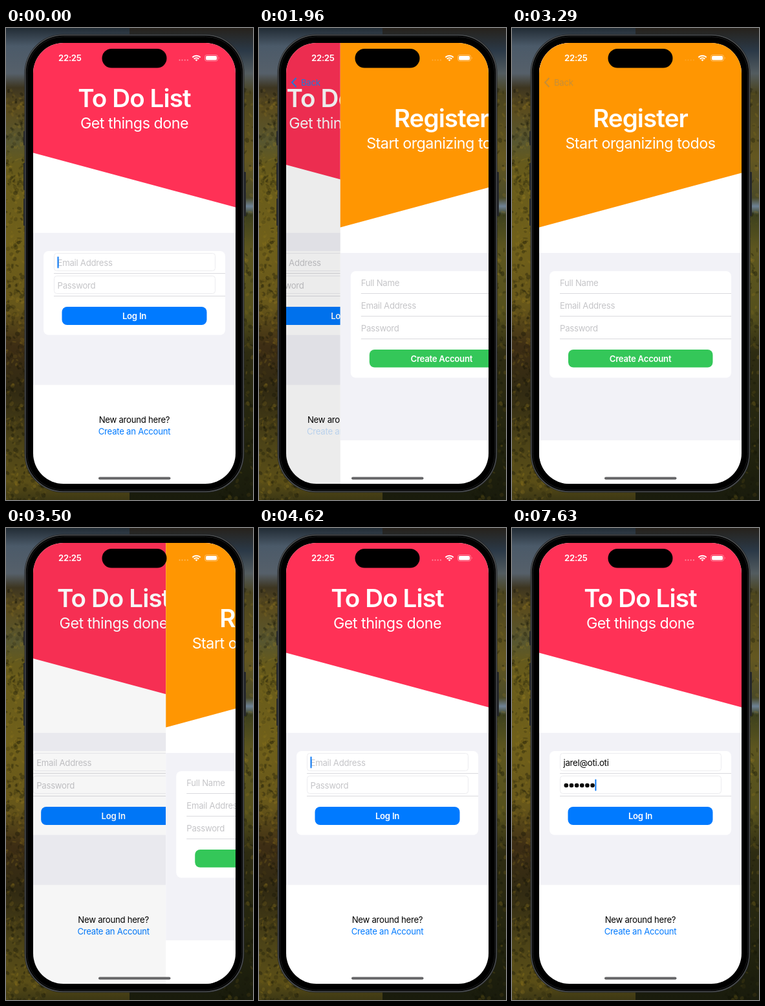
An HTML page with a canvas that plays this animation: 382 px wide and 728 px high, repeating every 8 s.

```html
<!DOCTYPE html>
<html lang="en">
<head>
<meta charset="utf-8">
<title>To Do List</title>
<style>
  html, body { margin: 0; width: 100%; height: 100%; overflow: hidden; background: #2b2a16; }
  canvas, svg { position: absolute; left: 0; top: 0; width: 382px; height: 728px; display: block; }
  text { font: 13.2px Inter, "Open Sans", sans-serif; letter-spacing: -.27px; white-space: pre; }
  .mid { text-anchor: middle; }
  .title { font-size: 38.6px; font-weight: 600; letter-spacing: -.9px; fill: #fff; }
  .sub { font-size: 23.3px; letter-spacing: -.5px; fill: #fff; }
  .bold { font-weight: 600; fill: #fff; }
  .hint { fill: #c5c5c8; }
  .blue { fill: #007aff; }
  .rule { stroke: #dadade; stroke-width: 1; }
  .box { fill: #fff; stroke: #ececef; }
</style>
</head>
<body>
<canvas id="hills" width="382" height="728"></canvas>
<svg viewBox="0 0 382 728">
  <defs>
    <clipPath id="screen"><rect x="42" y="23" width="313" height="680" rx="47"/></clipPath>
  </defs>

  <g fill="#25272a">
    <rect x="27" y="159" width="4" height="22" rx="1"/>
    <rect x="27" y="208" width="4" height="42" rx="1"/>
    <rect x="27" y="263" width="4" height="42" rx="1"/>
    <rect x="367" y="222" width="4" height="68" rx="1"/>
  </g>
  <rect x="28.5" y="9.5" width="340" height="707" rx="60" fill="#202224"/>
  <rect x="30" y="11" width="337" height="704" rx="58.5" fill="#000" stroke="#4b4e50" stroke-width="1.5"/>
  <rect x="32.5" y="13.5" width="332" height="699" rx="56" fill="#000" stroke="#1b1c1d"/>

  <g clip-path="url(#screen)">
    <g id="login">
      <rect x="42" y="23" width="313" height="680" fill="#fff"/>
      <path d="M42 23H355V276.5L42 192.5Z" fill="#ff3156"/>
      <text class="title mid" x="198.5" y="122">To Do List</text>
      <text class="sub mid" x="198.5" y="154.5">Get things done</text>
      <rect x="42" y="316" width="313" height="234.500" fill="#f2f2f7"/>
      <rect x="58" y="344" width="281" height="129.500" rx="8" fill="#fff"/>
      <rect class="box" x="74.500" y="347.500" width="249" height="27" rx="4"/>
      <rect class="box" x="74.500" y="382.500" width="249" height="27" rx="4"/>
      <path class="rule" d="M74 378.500H339M74 413.500H339"/>
      <text id="mailHint" class="hint" x="79.500" y="366.500">Email Address</text>
      <text id="mail" x="79.500" y="366.500">jarel@oti.oti</text>
      <text id="passHint" class="hint" x="79.500" y="401.500">Password</text>
      <g id="dots"></g>
      <rect id="caret" width="2" height="18" rx="1" fill="#0a78f5"/>
      <rect x="86.500" y="430" width="224" height="28" rx="8" fill="#007aff"/>
      <text class="bold mid" x="198.500" y="448.500">Log In</text>
      <text class="mid" x="198.500" y="608.500">New around here?</text>
      <text id="link" class="blue mid" x="198.500" y="626.500">Create an Account</text>
    </g>
    <rect id="dim" x="42" y="23" width="313" height="680"/>
    <g id="register">
      <rect x="42" y="23" width="313" height="680" fill="#fff"/>
      <path d="M42 23H355V223.500L42 307.500Z" fill="#ff9602"/>
      <text class="title mid" x="198.500" y="153">Register</text>
      <text class="sub mid" x="198.500" y="185.500">Start organizing todos</text>
      <rect x="42" y="347" width="313" height="289" fill="#f2f2f7"/>
      <rect x="58" y="375" width="281" height="164.500" rx="8" fill="#fff"/>
      <path class="rule" d="M74 409.500H339M74 444.500H339M74 479.500H339"/>
      <text class="hint" x="74" y="397.500">Full Name</text>
      <text class="hint" x="74" y="432.500">Email Address</text>
      <text class="hint" x="74" y="467.500">Password</text>
      <rect x="87" y="496" width="223.500" height="27.500" rx="8" fill="#34c759"/>
      <text class="bold mid" x="198.500" y="514.500">Create Account</text>
    </g>
    <g id="back">
      <path d="M57.500 77L51 84L57.500 91" fill="none" stroke="#1f78d8" stroke-width="2"/>
      <text x="65" y="88.500" fill="#1f78d8">Back</text>
    </g>
  </g>

  <text class="bold" x="81" y="51">22:25</text>
  <rect x="148.500" y="32" width="100" height="29.500" rx="14.750"/>
  <g id="signal" fill="#fff">
    <circle cx="268.500" cy="49.500" r="1"/><circle cx="272.500" cy="49.500" r="1"/>
    <circle cx="276.700" cy="49.500" r="1"/><circle cx="280.900" cy="49.500" r="1"/>
  </g>
  <g fill="none" stroke="#fff" stroke-width="2">
    <path d="M288.300 45.200A9 9 0 0 1 300.700 45.200M290.700 47.800A5.600 5.600 0 0 1 298.300 47.800"/>
    <path d="M292.500 49L294.500 51.300L296.500 49Q294.500 47.500 292.500 49Z" fill="#fff" stroke="none"/>
  </g>
  <rect x="307.500" y="41.500" width="20" height="9.500" rx="3" fill="none" stroke="#fff" stroke-opacity=".4"/>
  <rect x="309" y="43" width="17" height="6.500" rx="1.800" fill="#fff"/>
  <path d="M329 44.700q1.500 1.500 0 3z" fill="#fff" fill-opacity=".5"/>
  <rect x="143" y="692.500" width="111.500" height="4" rx="2" fill="#656567"/>
</svg>
<script>
const $ = id => document.getElementById(id);
const LOOP = 8000, STEP = 70, W = 313;
const KEYS = [6440, 6650, 6930, 7140, 7350, 7630];
const PITCH = 8.15;
// [time, opacity] of the text cursor
const CARET = [[0, 1], [490, .6], [560, .25], [630, 0], [910, .35], [980, .7], [1050, 1],
  [1610, 0], [4620, 1], [5880, .5], [5950, .15], [6020, 1]];

function paintHills() {
  const c = $('hills').getContext('2d');
  let seed = 11;
  const rnd = () => (seed = seed * 16807 % 2147483647) / 2147483647;
  const strip = (x, w, stops) => {
    const g = c.createLinearGradient(0, 0, 0, 728);
    stops.forEach(([y, col]) => g.addColorStop(y / 728, col));
    c.fillStyle = g;
    c.fillRect(x, 0, w, 728);
  };
  strip(0, 191, [[0, '#222c35'], [28, '#4b5a69'], [70, '#56606a'], [92, '#3d3520'], [125, '#5b4c1d'],
    [175, '#575630'], [210, '#665a1b'], [330, '#70601a'], [430, '#66561a'], [490, '#3d2d14'],
    [560, '#312a12'], [640, '#4c4317'], [700, '#5a4e17'], [728, '#3c3714']]);
  strip(191, 191, [[0, '#26221c'], [35, '#2b3947'], [70, '#535c60'], [100, '#4a431e'], [200, '#645720'],
    [262, '#4b4a28'], [275, '#6e8295'], [288, '#3d401d'], [340, '#5d561f'], [440, '#55501c'],
    [500, '#2e2c12'], [620, '#24250f'], [728, '#191b0c']]);
  for (let i = 0; i < 1500; i++) {
    const left = rnd() < .7;
    const x = left ? rnd() * 60 : 330 + rnd() * 52;
    const y = 90 + rnd() * 638;
    c.fillStyle = rnd() < .55 ? `rgba(15,16,5,${.1 + rnd() * .25})` : `rgba(165,135,35,${.05 + rnd() * .2})`;
    c.beginPath();
    c.ellipse(x, y, 1 + rnd() * 3, 1 + rnd() * 2.5, rnd() * 3, 0, 7);
    c.fill();
  }
}

// Critically damped spring, 0 to 1
const spring = ms => {
  const k = Math.max(0, ms) * .0178;
  return 1 - (1 + k) * Math.exp(-k);
};
const clamp = v => Math.min(1, Math.max(0, v));
const show = (id, v) => $(id).setAttribute('opacity', v);
const slide = (id, x) => $(id).setAttribute('transform', `translate(${x.toFixed(2)} 0)`);

function backOpacity(t) {
  if (t < 3290) return clamp((t - 1750) / 140);
  return t < 3430 ? .25 : 0;
}

function render(t) {
  const p = t < 3374 ? spring(t - 1814) : 1 - spring(t - 3374);
  slide('login', -.3 * W * p);
  slide('register', W * (1 - p));
  show('dim', .1 * p);
  show('back', backOpacity(t));
  show('signal', .5 - .35 * p);
  show('link', t >= 1610 && t < 3374 ? .22 : 1);

  const filled = t >= 5180, inPass = t >= 6020;
  const typed = KEYS.filter(k => t >= k).length;
  show('mailHint', filled ? 0 : 1);
  show('mail', filled ? 1 : 0);
  show('passHint', typed ? 0 : 1);
  [...$('dots').children].forEach((d, i) => d.setAttribute('opacity', i < typed ? 1 : 0));

  const x = inPass ? 79.5 + PITCH * typed : filled ? 79.5 + mailWidth : 79.5;
  $('caret').setAttribute('x', x);
  $('caret').setAttribute('y', inPass ? 387.5 : 352.5);
  show('caret', CARET.filter(s => t >= s[0]).pop()[1]);
}

paintHills();
$('dots').innerHTML = KEYS.map((_, i) => `<circle cx="${83.8 + PITCH * i}" cy="397" r="3.3"/>`).join('');
const mailWidth = $('mail').getComputedTextLength();
const start = performance.now();
(function frame() {
  const t = (performance.now() - start) % LOOP;
  render(Math.floor(t / STEP) * STEP);
  requestAnimationFrame(frame);
})();
</script>
</body>
</html>
```
